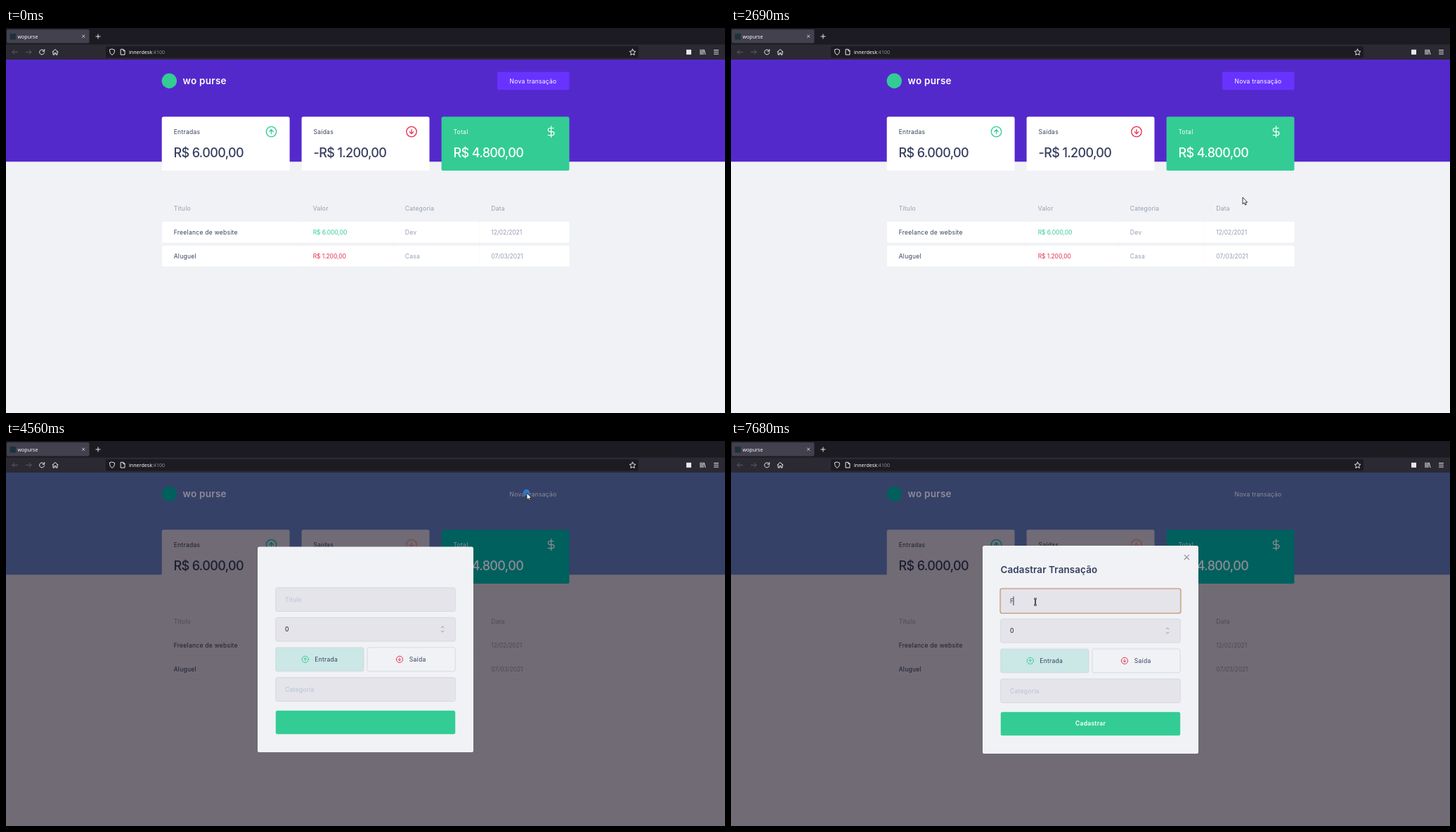
Animation of 1023x548 px, one loop 8000 ms. Source, as an HTML page:

```html
<!DOCTYPE html>
<html lang="pt-BR">
<head>
<meta charset="utf-8">
<title>wopurse</title>
<style>
  html, body { margin: 0; width: 100%; height: 100%; overflow: hidden; }
  svg {
    display: block; width: 100vw; height: 100vh;
    --head: #5429cc; --bg: #f0f2f5; --card: #fff; --ink: #363f5f; --mute: #969cb3;
    --green: #33cc95; --red: #e52e4d; --btn: #6933ff; --pale: #fff;
  }
  #page.dim {
    --head: #364168; --bg: #706b75; --card: #706b75; --ink: #1c1f30; --mute: #4d4b58;
    --green: #00605d; --red: #7e4a48; --btn: #364168; --pale: #8e8b98;
  }
  #page.hover { --btn: #5200ff; }
  text { font: 8.53px Inter, sans-serif; letter-spacing: .032em; fill: var(--ink); white-space: pre; }
  .mid { text-anchor: middle; }
  .big { font-size: 18px; font-weight: 500; letter-spacing: -.035em; }
  .semi { font-weight: 600; }
  .num { letter-spacing: -.01em; }
  .mute { fill: var(--mute); }
  .green { fill: var(--green); color: var(--green); }
  .red { fill: var(--red); color: var(--red); }
  .pale { fill: var(--pale); color: var(--pale); }
  .hint { fill: #b9c1d6; }
  .brand { font-size: 13.5px; letter-spacing: .02em; }
  .heading { font-size: 13.4px; letter-spacing: .01em; }
  .ui text { font: 7.1px "Noto Sans", sans-serif; letter-spacing: 0; fill: #fbfbfe; }
  .line { fill: none; stroke: currentColor; stroke-linecap: round; stroke-linejoin: round; }
  .field { fill: #e4e4ea; stroke: #d0d0d8; }
  .hide { display: none; }
</style>
</head>
<body>
<svg viewBox="0 0 1023 548" preserveAspectRatio="none">
  <defs>
    <g id="up" class="line">
      <circle r="7.2"/><path d="M0 3V-3M-2.9 0L0-3L2.9 0"/>
    </g>
    <g id="cells">
      <rect x="222" width="198" height="29.8" rx="2.2"/>
      <rect x="420" width="131" height="29.8" rx="2.2"/>
      <rect x="551" width="122.5" height="29.8" rx="2.2"/>
      <rect x="673.5" width="128" height="29.8" rx="2.2"/>
    </g>
  </defs>

  <!-- Browser frame -->
  <g class="ui">
    <rect width="1023" height="45" fill="#2b2a33"/>
    <rect width="1023" height="23.5" fill="#1c1b22"/>
    <rect x="1" y="2" width="117.5" height="19.5" rx="2" fill="#42414d"/>
    <rect x="142" y="26" width="758" height="16.5" rx="2" fill="#1c1b22"/>
    <rect x="5.5" y="8" width="8.5" height="8.5" fill="#1d323b"/>
    <text x="16.5" y="14.5">wopurse</text>
    <text x="175" y="37">innerdesk<tspan fill="#8f8f9d">:4100</tspan></text>
    <g class="line" color="#5d5c68">
      <path d="M16.5 34.3H9M12 31.3L9 34.3L12 37.3M28.5 34.3H36M33 31.3L36 34.3L33 37.3"/>
    </g>
    <g class="line" color="#e8e8ee">
      <path stroke-width=".8" d="M108.5 10L112 13.5M112 10L108.5 13.5"/>
      <path d="M128 12H134M131 9V15"/>
      <path d="M54.2 32.6A3.5 3.5 0 1 0 54.6 35M54.7 30.5V33.2H52"/>
      <path d="M66 34L70 30.5L74 34M67 33.5V38H69V35.5H71V38H73V33.5"/>
      <path d="M151 30L154.5 31.2C154.5 35 153.5 37 151 38.3C148.5 37 147.5 35 147.5 31.2Z"/>
      <path d="M163.5 30.3H167L169 32.3V38H163.5ZM166.8 30.5V32.5H169"/>
      <path transform="translate(891.5 34.3)" d="M0-4.2L1.3-1.4L4.3-1L2.1 1.1L2.7 4.1L0 2.7L-2.7 4.1L-2.1 1.1L-4.3-1L-1.3-1.4Z"/>
      <path d="M988 31V37.5M990 31V37.5M992 31V37.5M993.3 31.2L995 37.5"/>
      <path d="M1007.5 31.5H1013.5M1007.5 34.2H1013.5M1007.5 37H1013.5"/>
    </g>
    <rect x="968" y="30.8" width="7" height="7" fill="#e8e8ee"/>
  </g>

  <g id="page">
    <rect y="45" width="1023" height="503" fill="var(--bg)"/>
    <rect y="45" width="1023" height="145.3" fill="var(--head)"/>
    <circle class="green" cx="232.3" cy="75.3" r="10.7"/>
    <text class="semi pale brand" x="251.5" y="80">wo purse</text>
    <rect x="699" y="62.5" width="102.5" height="25.5" rx="2.5" fill="var(--btn)"/>
    <text class="mid pale" x="750" y="78.5">Nova transação</text>

    <g fill="var(--card)">
      <rect x="221.7" y="126.3" width="181.9" height="76.8" rx="2.6"/>
      <rect x="420.6" y="126.3" width="181.9" height="76.8" rx="2.6"/>
      <use href="#cells" y="275.8"/>
      <use href="#cells" y="309.8"/>
    </g>
    <rect class="green" x="619.6" y="126.3" width="181.9" height="76.8" rx="2.6"/>

    <text x="238.7" y="150.8">Entradas</text>
    <text x="437.5" y="150.8">Saídas</text>
    <text class="pale" x="636.5" y="150.8">Total</text>
    <text class="big" x="238.5" y="184.2">R$ 6.000,00</text>
    <text class="big" x="437.5" y="184.2">-R$ 1.200,00</text>
    <text class="big pale" x="636.5" y="184.2">R$ 4.800,00</text>
    <g stroke-width="1.3">
      <use href="#up" class="green" transform="translate(377.5 147.6)"/>
      <use href="#up" class="red" transform="translate(577 147.6) rotate(180)"/>
    </g>
    <g class="line" color="var(--pale)" stroke-width="1.7" transform="translate(767 138.9) scale(.72)">
      <path d="M12 1V23M17 5H9.5a3.5 3.5 0 0 0 0 7h5a3.5 3.5 0 0 1 0 7H6"/>
    </g>

    <text class="mute" x="238.7" y="259.7">Título</text>
    <text class="mute" x="436.7" y="259.7">Valor</text>
    <text class="mute" x="567.8" y="259.7">Categoria</text>
    <text class="mute" x="690.3" y="259.7">Data</text>
    <text x="238.7" y="293.8">Freelance de website</text>
    <text class="num green" x="436.7" y="293.8">R$ 6.000,00</text>
    <text class="mute" x="567.8" y="293.8">Dev</text>
    <text class="num mute" x="690.3" y="293.8">12/02/2021</text>
    <text x="238.7" y="327.9">Aluguel</text>
    <text class="num red" x="436.7" y="327.9">R$ 1.200,00</text>
    <text class="mute" x="567.8" y="327.9">Casa</text>
    <text class="num mute" x="690.3" y="327.9">07/03/2021</text>
  </g>

  <g id="modal">
    <rect id="panel" x="358" width="307" rx="2.6" fill="#f0f2f5"/>
    <g id="late">
      <path class="line" color="#8d8d99" stroke-width="1.1" d="M645.3 162.3L651.5 168.5M651.5 162.3L645.3 168.5"/>
      <text class="semi heading" x="383.5" y="188.3">Cadastrar Transação</text>
    </g>
    <g id="form">
      <g class="field" stroke-width=".7">
        <rect x="383.8" y="210.8" width="255.4" height="33.8" rx="2.3"/>
        <rect x="383.8" y="253.3" width="255.4" height="33.8" rx="2.3"/>
        <rect x="383.8" y="338.7" width="255.4" height="33.8" rx="2.3"/>
        <rect x="383.8" y="296" width="125.2" height="33.8" rx="2.3" fill="#cbe7e6"/>
        <rect x="514" y="296" width="125.2" height="33.8" rx="2.3" fill="#f0f2f5"/>
      </g>
      <rect class="green" x="383.8" y="385.7" width="255.4" height="33.6" rx="2.5"/>
      <rect id="ring" x="383" y="210" width="257" height="35.2" rx="2.8" fill="none" stroke="#c48a62" stroke-width="1.1"/>
      <text id="title" x="397" y="230.6"></text>
      <rect id="caret" y="221.3" width=".9" height="12.7" fill="#222"/>
      <text x="397" y="273.1" style="fill:#111">0</text>
      <path class="line" color="#8a8a92" stroke-width=".8" d="M619.4 267.8L621.2 265.8L623 267.8M619.4 272.2L621.2 274.2L623 272.2"/>
      <g stroke-width="1.5">
        <use href="#up" class="green" transform="translate(425.8 312.8) scale(.64)"/>
        <use href="#up" class="red" transform="translate(560 312.8) rotate(180) scale(.64)"/>
      </g>
      <text x="439.3" y="315.9">Entrada</text>
      <text x="573.8" y="315.9">Saída</text>
      <text class="hint" x="397" y="358.5">Categoria</text>
      <text id="submit" class="semi mid pale" x="511.5" y="405.4">Cadastrar</text>
    </g>
  </g>

  <g id="pointer" stroke-linejoin="round">
    <circle id="busy" cx="-.5" cy="-.8" r="4.5" fill="#2f78d0"/>
    <path id="arrow" d="M0 0V9.6L2.2 7.6L3.8 11L5.3 10.3L3.8 7.1H6.7Z" fill="#fff" stroke="#222" stroke-width=".9"/>
    <path id="hand" d="M0-1.5Q1-2.6 1.8-1.3V2L5 2.6Q6.5 3 6.2 4.5L5.3 8H1.2L-1.3 4.5Q-1 3.3 0 4Z" fill="#fff" stroke="#222" stroke-width=".7"/>
    <g id="beam" fill="none">
      <path d="M-2-4.5H2M0-4.5V4.5M-2 4.5H2" stroke="#222" stroke-width="2"/>
      <path d="M-2-4.5H2M0-4.5V4.5M-2 4.5H2" stroke="#ddd" stroke-width=".5"/>
    </g>
  </g>
</svg>
<script>
  const LOOP = 8000, OPEN = 4560, READY = 4640, FOCUS = 6150, TYPED = 7680;
  const $ = id => document.getElementById(id);
  const show = (id, on) => $(id).classList.toggle('hide', !on);

  // Pointer path: time, x, y
  const path = [
    [500, 453, 255], [800, 375, 283], [1170, 257, 287], [1480, 257, 287],
    [1640, 252, 268], [1890, 280, 298], [2250, 410, 306], [2320, 410, 306],
    [2690, 728, 241], [3010, 728, 241], [3260, 722, 205], [3550, 796, 140],
    [3780, 776, 93], [3840, 776, 93], [4080, 741, 74], [4680, 741, 74],
    [5270, 430, 257], [5310, 430, 257], [5420, 433, 229], [LOOP, 433, 229]
  ];

  // Slope at a point; zero where the pointer rests
  function slope(i, k) {
    const a = path[i - 1], b = path[i], c = path[i + 1];
    const rests = (p, q) => p[1] === q[1] && p[2] === q[2];
    if (!a || !c || rests(a, b) || rests(b, c)) return 0;
    return (c[k] - a[k]) / (c[0] - a[0]);
  }

  function pointerAt(t) {
    let i = 0;
    while (i < path.length - 2 && t >= path[i + 1][0]) i++;
    const a = path[i], b = path[i + 1], d = b[0] - a[0];
    const u = Math.max(0, (t - a[0]) / d), v = 1 - u;
    return [1, 2].map(k =>
      a[k] * v * v * (1 + 2 * u) + b[k] * u * u * (3 - 2 * u) +
      d * u * v * (slope(i, k) * v - slope(i + 1, k) * u));
  }

  function draw(t) {
    const [x, y] = pointerAt(t);
    const open = t >= OPEN, ready = t >= READY, typed = t >= TYPED;
    const onButton = !open && x > 699 && x < 801 && y > 62 && y < 88;
    const onField = ready && x > 384 && x < 639 && (y > 210 && y < 245 || y > 253 && y < 287);

    $('page').classList.toggle('dim', open);
    $('page').classList.toggle('hover', onButton);

    show('modal', open);
    show('late', ready);
    show('submit', ready);
    $('panel').setAttribute('y', ready ? 149 : 150.5);
    $('panel').setAttribute('height', ready ? 296 : 292.5);
    $('form').setAttribute('transform', `translate(0 ${ready ? 0 : -2})`);

    show('ring', t >= FOCUS);
    show('caret', t >= FOCUS && t < 6470 || t >= 7270);
    $('caret').setAttribute('x', typed ? 401.5 : 397);
    $('title').textContent = typed ? 'F' : 'Título';
    $('title').classList.toggle('hint', !typed);

    show('pointer', t >= 500);
    show('busy', open && !ready);
    show('hand', onButton);
    show('beam', onField);
    show('arrow', !onButton && !onField);
    $('pointer').setAttribute('transform', `translate(${x} ${y})`);
  }

  const start = performance.now();
  function frame() {
    draw((performance.now() - start) % LOOP);
    requestAnimationFrame(frame);
  }
  frame();
</script>
</body>
</html>
```
